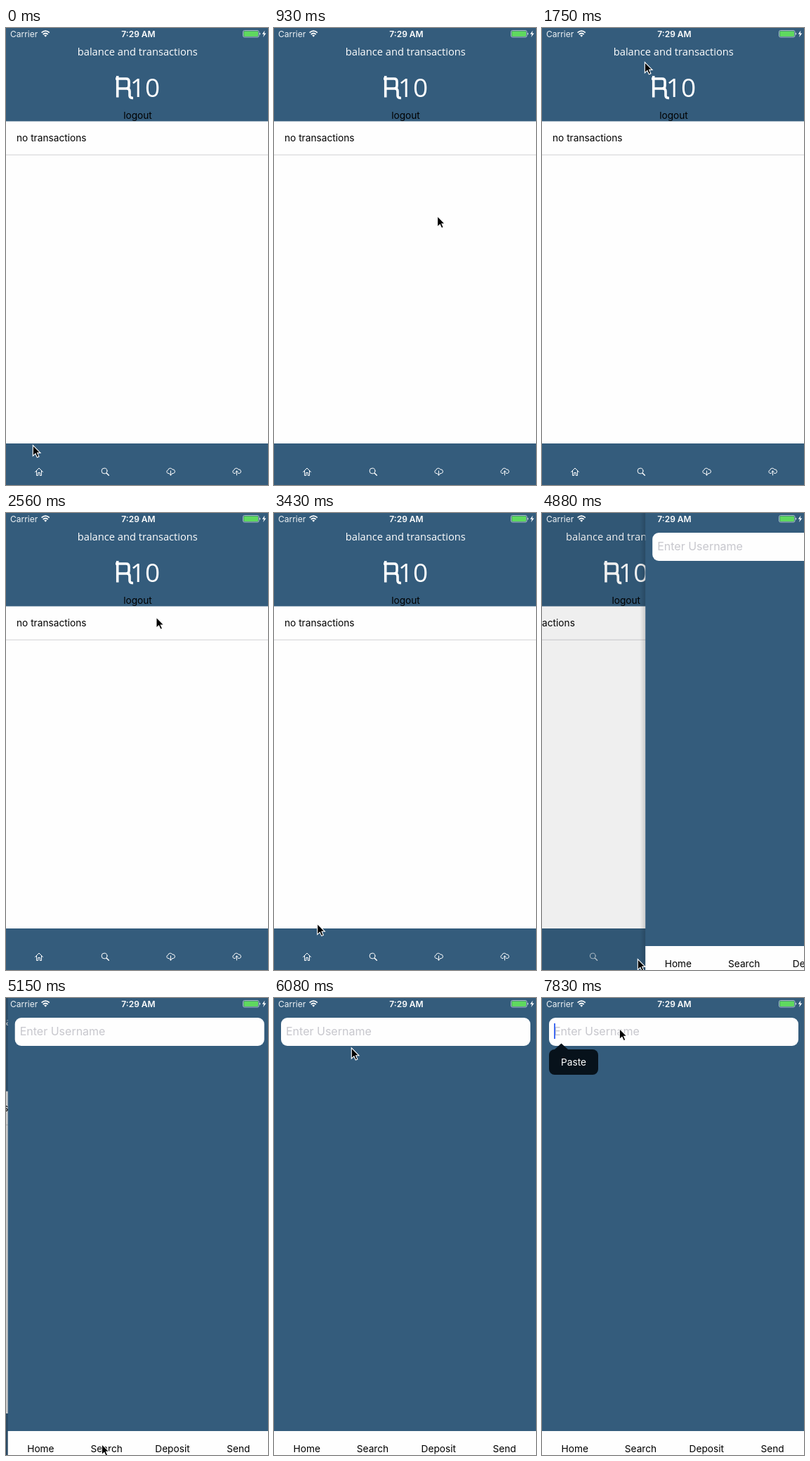
Write an HTML page that moves like this. It is 373 px wide and 649 px high and loops after 8000 ms.

```html
<!DOCTYPE html>
<html lang="en">
<head>
<meta charset="utf-8">
<title>Wallet app</title>
<style>
  html, body { margin: 0; width: 100%; height: 100%; overflow: hidden; background: #345c7c; }
  svg { display: block; width: 100%; height: 100%; }
  text { font: 13.7px Inter, Roboto, sans-serif; white-space: pre; }
  .mid { text-anchor: middle; }
  .brand { font-family: "Open Sans", "Noto Sans", sans-serif; fill: #fff; }
  .icon { fill: none; stroke: #fff; stroke-linejoin: round; stroke-linecap: round; }
</style>
</head>
<body>
<svg viewBox="0 0 373 649">
  <defs>
    <linearGradient id="shade">
      <stop offset="0" stop-opacity="0"/>
      <stop offset="1" stop-opacity=".15"/>
    </linearGradient>
    <path id="cloud" d="M-2.200 2.500H-3.600A2.400 2.400 0 0 1-3.800-2.200 3.300 3.300 0 0 1 2.400-3 2.800 2.800 0 0 1 3.800 2.500H2.200M0-1V5"/>
  </defs>

  <g id="home">
    <rect width="373" height="649" fill="#fefefe"/>
    <rect width="373" height="132.5" fill="#345c7c"/>
    <text class="brand mid" x="187.3" y="39" style="font-size:14.7px">balance and transactions</text>
    <path d="M158.700 68V98.500M156 72H171Q175 72 175 76V82Q175 86 171 86H159M168 86H172Q176 86 176 90V96Q176 99.500 181 99.500" fill="none" stroke="#fff" stroke-width="3.6"/>
    <text class="brand" x="176.8" y="98" style="font-size:37px">10</text>
    <text class="mid" x="187.5" y="129">logout</text>
    <text x="15" y="161">no transactions</text>
    <rect y="179.5" width="373" height="1.5" fill="#e0e0e2"/>
    <rect y="590" width="373" height="59" fill="#345c7c"/>
    <g class="icon">
      <path d="M41.500 630.500 47 625 52.500 630.500M43.500 629V635.500H45.700V631.500H48.300V635.500H50.500V629"/>
      <g id="search"><circle cx="140" cy="629" r="3.9"/><path d="M143 632 146.300 635.300" stroke-width="1.5"/></g>
      <g transform="translate(234.5 630)"><use href="#cloud"/><path d="M-2 3.200 0 5.200 2 3.200"/></g>
      <g transform="translate(328.5 630)"><use href="#cloud"/><path d="M-2 1 0-1 2 1"/></g>
    </g>
  </g>
  <rect id="dim" width="373" height="649"/>

  <g id="find">
    <rect id="edge" x="-8" width="8" height="649" fill="url(#shade)"/>
    <rect width="373" height="649" fill="#345c7c"/>
    <rect x="10" y="28" width="355" height="40" rx="9" fill="#fefefe"/>
    <text x="17" y="53" fill="#c7c7cd" style="font-size:16px">Enter Username</text>
    <rect id="caret" x="17" y="36" width="2" height="22" fill="#426bf2"/>
    <rect y="615" width="373" height="34" fill="#fefefe"/>
    <g id="tabs" class="mid"></g>
    <g id="popup">
      <path d="M18 73 27.500 64.500 37 73Z" fill="#07121b"/>
      <rect x="10" y="73" width="70" height="36" rx="8" fill="#07121b"/>
      <text class="mid" x="45" y="96" fill="#fff">Paste</text>
    </g>
  </g>

  <g fill="#fff">
    <text x="6" y="12.5" fill="#eef2f5" style="font-size:12px">Carrier</text>
    <path d="M50.600 6.700Q56.200 1.700 61.800 6.700M52.700 9Q56.200 6 59.700 9" fill="none" stroke="#fff" stroke-width="1.7"/>
    <path d="M54.200 10.500Q56.200 9 58.200 10.500L56.200 12.700Z"/>
    <text class="mid" x="188.5" y="12.5" style="font-size:12px;font-weight:600">7:29 AM</text>
    <rect x="337.5" y="3.5" width="22.5" height="9.500" rx="2" fill="none" stroke="#a9bdca"/>
    <rect x="338.5" y="4.5" width="20.5" height="7.500" rx="1" fill="#5fd95f"/>
    <path d="M361 6.500Q363 8.200 361 10Z"/>
    <path d="M368.500 3.500 364.700 8.800H367.200L366 13 370.300 7.400H367.600Z"/>
  </g>

  <path id="cursor" d="M.3.500V15.700L3.900 12.400 6.300 17.700 8.900 16.600 6.600 11.400H11Z" stroke="#fff" stroke-width="1.1"/>
</svg>
<script>
const $ = id => document.getElementById(id);
const LOOP = 8000, WIDTH = 373;

["Home", "Search", "Deposit", "Send"].forEach((name, i) => {
  $("tabs").innerHTML += `<text x="${46.7 + i * 93.8}" y="645">${name}</text>`;
});

// Pointer sweeps: start and end time, bend point, end point
const rest = [38, 592];
const sweeps = [
  { from: 50, to: 450, bend: [20, 480], end: [97, 358] },
  { from: 810, to: 1580, bend: [416, 200], end: [146, 44] },
  { from: 1640, to: 2440, bend: [136, 44], end: [204, 104] },
  { from: 2500, to: 2900, bend: [232, 170], end: [183, 316] },
  { from: 3140, to: 3890, bend: [-34, 611], end: [132, 645] },
  { from: 3950, to: 4240, bend: [112, 640], end: [136, 633] },
  { from: 5200, to: 6300, bend: [109, 390], end: [110, 43] }
];

const ramp = (t, from, to) => Math.min(1, Math.max(0, (t - from) / (to - from)));
const show = (id, opacity) => $(id).setAttribute("opacity", opacity);
const move = (id, x, y = 0) => $(id).setAttribute("transform", `translate(${x} ${y})`);

// Each sweep is a quadratic curve, eased out
function pointer(t) {
  return sweeps.reduce((at, { from, to, bend, end }) => {
    const v = (1 - ramp(t, from, to)) ** 2, u = 1 - v;
    return at.map((a, k) => v * v * a + 2 * u * v * bend[k] + u * u * end[k]);
  }, rest);
}

// Critically damped push from the right
function pushOffset(t) {
  const s = Math.max(0, t - 4770) * 0.0184;
  const x = WIDTH * (1 + s) * Math.exp(-s);
  return x < 0.4 ? 0 : x;
}

function draw(t) {
  const x = pushOffset(t), done = 1 - x / WIDTH;
  move("home", -0.3 * WIDTH * done);
  move("find", x);
  show("dim", 0.1 * done);
  show("edge", t < 4770 ? 0 : 1);
  show("search", 1 - 0.65 * (ramp(t, 4500, 4590) - ramp(t, 4790, 4990)));
  show("caret", t < 6390 ? 0 : 1 - ramp(t, 7020, 7150) + ramp(t, 7320, 7410));
  show("popup", ramp(t, 7080, 7280));
  move("cursor", ...pointer(t));
}

const start = performance.now();
function frame() {
  draw((performance.now() - start) % LOOP);
  requestAnimationFrame(frame);
}
frame();
</script>
</body>
</html>
```
